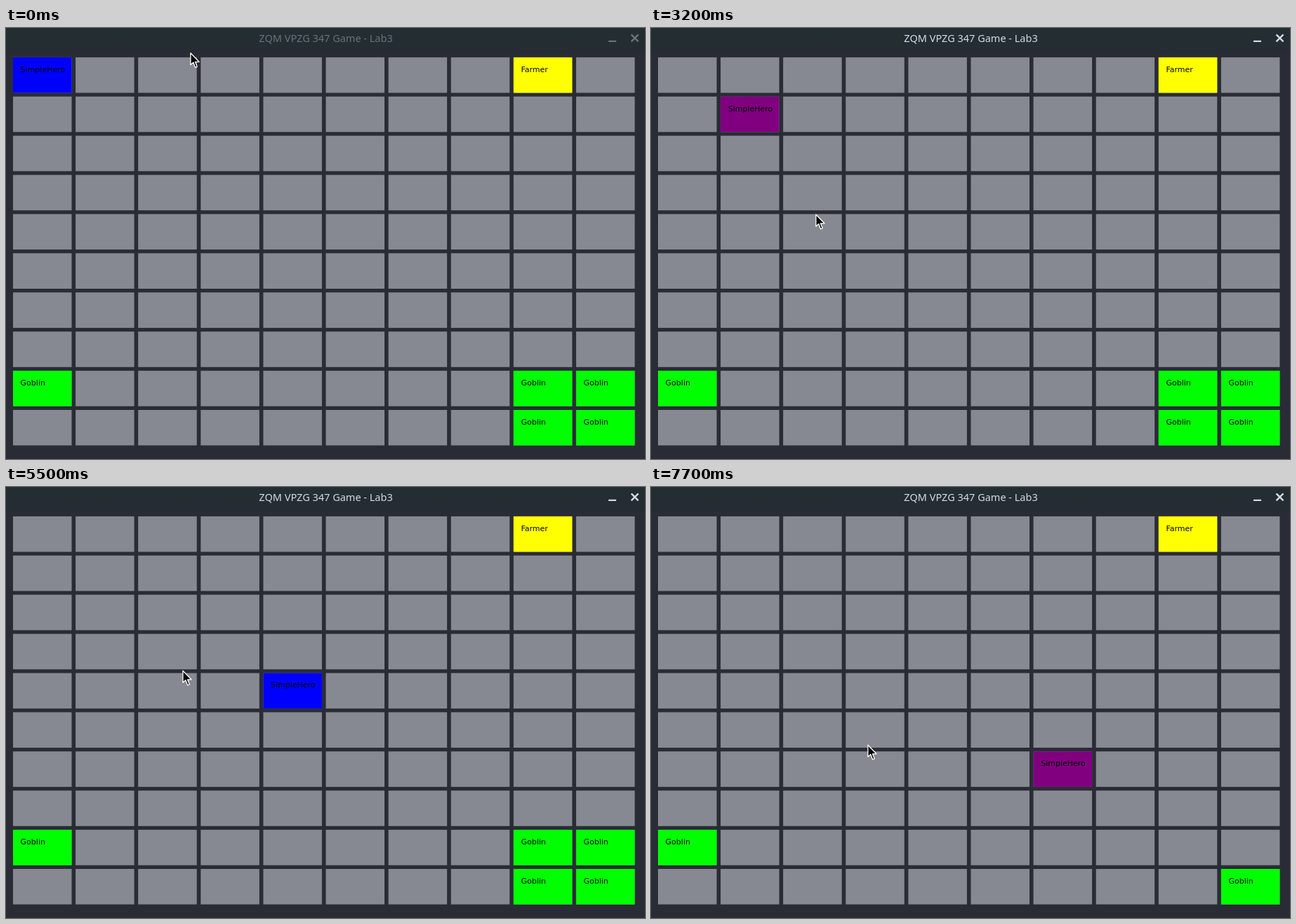
An HTML page that plays this animation: 910x615 px, repeating every 8000 ms.

```html
<!DOCTYPE html>
<html lang="en">
<head>
<meta charset="utf-8">
<title>Grid game</title>
<style>
  html, body { margin: 0; width: 100%; height: 100%; overflow: hidden; background: #292c35; }
  svg { display: block; width: 910px; height: 615px; }
  .label { font: 11px "DejaVu Sans", sans-serif; fill: #000; }
  .title { font: 14.5px "Noto Sans", sans-serif; text-anchor: middle; }
</style>
</head>
<body>
<svg viewBox="0 0 910 615" xmlns="http://www.w3.org/2000/svg">
  <defs>
    <linearGradient id="bar" x1="0" y1="0" x2="0" y2="1">
      <stop offset="0" stop-color="#232e32"/>
      <stop offset=".7" stop-color="#232d32"/>
      <stop offset="1" stop-color="#292c35"/>
    </linearGradient>
  </defs>
  <rect width="910" height="615" fill="#292c35"/>
  <rect width="910" height="38" fill="url(#bar)"/>
  <g id="head">
    <text class="title" x="455.5" y="20.4">ZQM VPZG 347 Game - Lab3</text>
    <rect x="858" y="17.8" width="11" height="2.2"/>
    <path d="M890.5 9.3 900.5 19.3M900.5 9.3 890.5 19.3" stroke="currentColor" stroke-width="2.4"/>
  </g>
  <g id="board"></g>
  <path id="cursor" d="M.9 1.2V18L4.8 14.6 7.6 21.8 10.3 20.7 7.4 13.8H13Z"
        fill="#000" stroke="#fff" stroke-width="1.3" stroke-linejoin="round"/>
</svg>
<script>
const LOOP = 8000;
const GREY = '#868991', BLUE = '#0000ff', PURPLE = '#800080', GREEN = '#00ff00', YELLOW = '#ffff00';
const START = 1700, FIGHT = 7700;

// [time, column and row on the diagonal, colour]
const heroSteps = [
  [0, 0, BLUE], [START, 0, PURPLE], [2800, 1, PURPLE], [3500, 2, PURPLE],
  [4300, 3, BLUE], [5200, 4, BLUE], [5900, 5, BLUE], [6700, 6, BLUE], [FIGHT, 6, PURPLE]
];

// [time, x, y]
const cursorSteps = [
  [0, 262, 34.5], [300, 265, 20],
  [1000, 267, 27], [1100, 270, 35], [1200, 271, 41],
  [2100, 278, 58], [2200, 277, 88], [2300, 265, 107.5],
  [2800, 270, 122], [2900, 268, 155], [3000, 258, 200], [3100, 244, 240], [3200, 234, 265],
  [3700, 430, 276], [3800, 601, 282.5],
  [4500, 530, 330], [4600, 380, 415], [4700, 298, 463],
  [5200, 284, 420], [5300, 262, 357], [5500, 251, 261],
  [6100, 276, 308], [6200, 308, 367]
];

const board = document.getElementById('board');
const head = document.getElementById('head');
const cursor = document.getElementById('cursor');

const make = (tag, attrs, parent) => {
  const el = document.createElementNS('http://www.w3.org/2000/svg', tag);
  for (const key in attrs) el.setAttribute(key, attrs[key]);
  return parent.appendChild(el);
};
const cellX = col => 10 + 89.1 * col;
const cellY = row => 41.9 + 55.9 * row;

const cell = (col, row, fill, parent = board) =>
  make('rect', { x: cellX(col), y: cellY(row), width: 83.5, height: 50.6, fill }, parent);

const piece = (col, row, fill, name) => {
  const g = make('g', {}, board);
  cell(col, row, fill, g);
  make('text', { x: cellX(col) + 10.6, y: cellY(row) + 20.8, class: 'label' }, g).textContent = name;
  return g;
};

for (let row = 0; row < 10; row++)
  for (let col = 0; col < 10; col++) cell(col, row, GREY);

piece(8, 0, YELLOW, 'Farmer');
piece(0, 8, GREEN, 'Goblin');
piece(9, 9, GREEN, 'Goblin');
const fallen = [[8, 8], [9, 8], [8, 9]].map(([col, row]) => piece(col, row, GREEN, 'Goblin'));
const hero = piece(0, 0, BLUE, 'SimpleHero');

const current = (steps, t) => steps.filter(step => step[0] <= t).pop();

function draw(t) {
  const [, place, fill] = current(heroSteps, t);
  hero.setAttribute('transform', `translate(${89.1 * place} ${55.9 * place})`);
  hero.firstChild.setAttribute('fill', fill);

  const [, x, y] = current(cursorSteps, t);
  cursor.setAttribute('transform', `translate(${x} ${y})`);

  const tint = t < START ? '#6a7278' : '#d3dae3';
  head.setAttribute('fill', tint);
  head.setAttribute('color', tint);
  fallen.forEach(g => g.setAttribute('visibility', t < FIGHT ? 'visible' : 'hidden'));
}

function tick() {
  draw(performance.now() % LOOP);
  requestAnimationFrame(tick);
}
tick();
</script>
</body>
</html>
```
